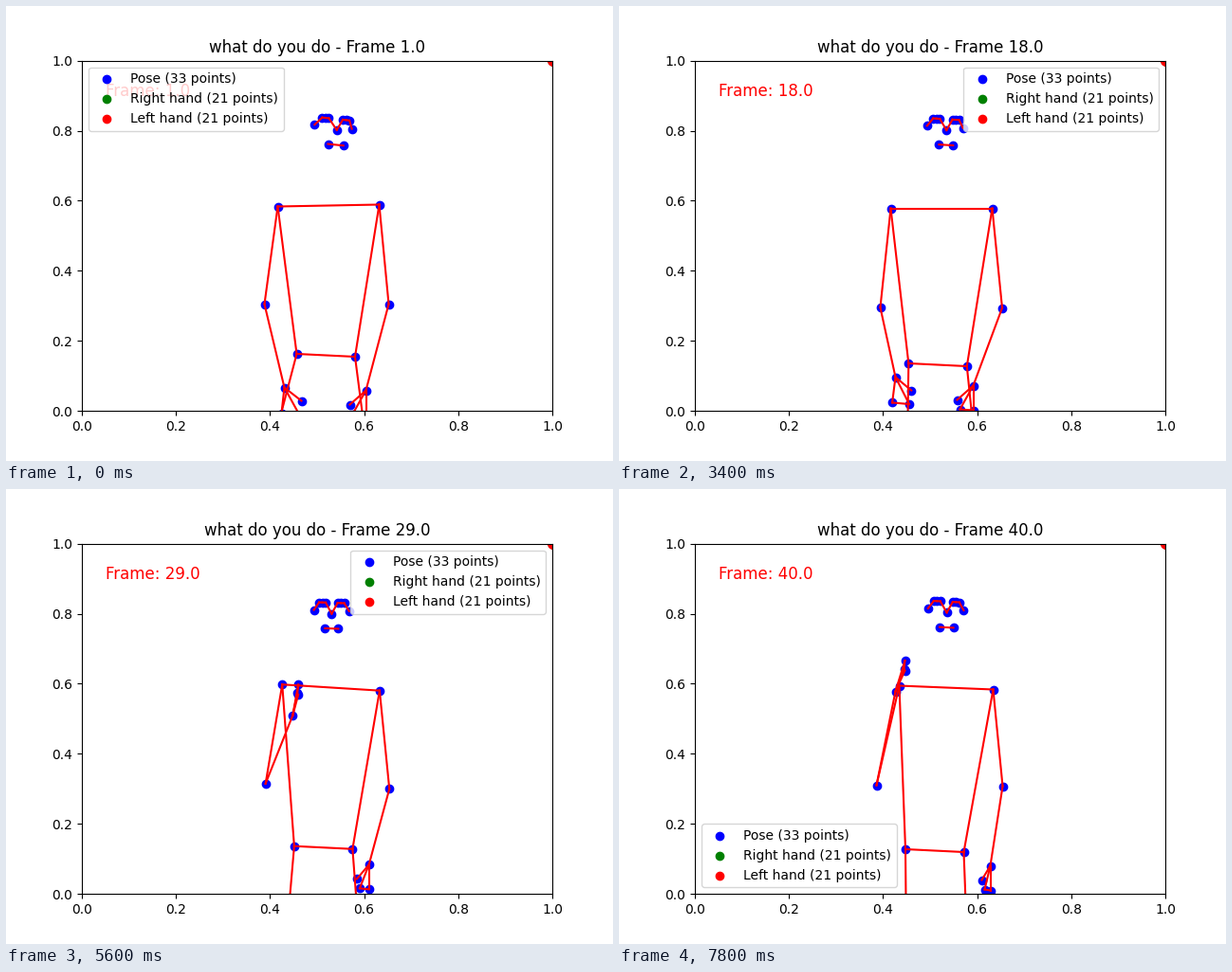
Animation of 640x480 px, one loop 8000 ms. Source, as a matplotlib script:

```python
import matplotlib.pyplot as plt
import numpy as np
from matplotlib.animation import FuncAnimation

COUNT, STEP_MS = 40, 200

# Phases of the gesture: first and last step of each.
PHASES = {"settle": (1, 6), "shift": (6, 11), "sink": (11, 18),
          "reach": (18, 25), "lift": (25, 34), "drop": (34, 40)}
SIDES = {"r": -1, "l": 1}
CHAIN = ["shoulder", "elbow", "wrist"]
LEG = ["shoulder", "hip", "knee", "ankle"]
PALM = ["wrist", "pinky", "index", "wrist", "thumb"]
EYES = ["inner", "eye", "outer", "ear"]


def amount(name, n):
    a, b = PHASES[name]
    s = np.clip((n - a) / (b - a), 0, 1)
    return s * s * (3 - 2 * s)


def shifted(n, start, **moves):
    """Start value plus the share of each phase's move done by step n."""
    value = np.array(start, float)
    for name, move in moves.items():
        value += amount(name, n) * np.array(move)
    return value


def face(n):
    x, y, yaw = shifted(n, (343, 118.7, 0.75), settle=(0, 0.2, -0.12), shift=(0, 0, -0.23),
                        sink=(-0.3, 0, -0.1), reach=(-0.3, 0.6, -0.05),
                        lift=(0.5, 0, -0.5), drop=(0.8, -1.2, 0.45))

    def at(side, spread, depth, down):
        return (x + side * (spread + 1.5 * yaw) + yaw * depth,
                y + down + 0.12 * side * spread * (yaw + 0.25))

    pts = {"nose": (x + 7 * yaw, y + 11.6)}
    for key, side in SIDES.items():
        for i, name in enumerate(EYES[:3]):
            pts[f"{key}_{name}"] = at(side, 6.2 + 3.5 * i, 5.7, 0)
        pts[f"{key}_ear"] = at(side, 18.5, 2, 8.2)
        pts[f"{key}_mouth"] = at(side, 7, 5.5, 27.2)
    return pts


def torso(n):
    hips = shifted(n, (0, 0), settle=(0, 7), sink=(-1.2, 3), reach=(-0.8, 1),
                   lift=(-1.5, -3), drop=(-1, 5))
    pts = {
        "r_shoulder": shifted(n, (286, 211), settle=(0, 2), reach=(1, -1),
                              lift=(9, -15), drop=(-1, 10)),
        "l_shoulder": shifted(n, (393, 209), settle=(0, 4), lift=(1, -2)),
        "r_hip": hips + (306, 366.5),
        "l_hip": hips + (367.5, 369.5),
        "r_knee": shifted(n, (286, 443), settle=(11, -9), shift=(6, -12),
                          sink=(1, 11), reach=(-8, 0), lift=(6, 0)),
        "l_knee": shifted(n, (376, 435), settle=(6, 0), sink=(-10, 0), lift=(-7, 0)),
    }
    for key in SIDES:
        pts[f"{key}_ankle"] = pts[f"{key}_knee"] + (0, 130)
    return pts


def right_arm(n):
    wrist = shifted(n, (293, 402), settle=(6, -2), shift=(-9, -4), sink=(1, -5),
                    reach=(12, -135), lift=(-3, -42), drop=(-9, -1))
    spread = shifted(n, 1, shift=-0.8, sink=0.7)
    up, lean = amount("reach", n), 3 + 7 * amount("lift", n)

    def finger(hanging, raised):
        return wrist + (1 - up) * np.array(hanging) + up * np.array(raised)

    return {
        "r_elbow": shifted(n, (272, 314), settle=(3, 3.5), reach=(-1, 9.5),
                           lift=(-2, -40), drop=(-1, 25)),
        "r_wrist": wrist,
        "r_pinky": finger((4 * spread - 7, 26 + spread), (lean - 1, -23.5)),
        "r_index": finger((1 + 15 * spread, 24 + 5 * spread), (lean, -32.5)),
        "r_thumb": finger((5 + 13 * spread, 14), (lean, -22)),
    }


def left_arm(n):
    wrist = shifted(n, (379, 405), settle=(-3, 4), shift=(5, -1), sink=(-8, -8),
                    reach=(5, -5), lift=(10, 2), drop=(3, 0))
    spread = shifted(n, 17, reach=-3, lift=-3, drop=-2)
    return {
        "l_elbow": shifted(n, (403, 314), settle=(0.5, 6), sink=(0, -2), lift=(0.5, -5)),
        "l_wrist": wrist,
        "l_pinky": wrist + (0, 26),
        "l_index": wrist + (3 - spread, 25),
        "l_thumb": wrist + (-spread, 15),
    }


def pose(n):
    """All joints in axes units, worked out in stage pixels."""
    joints = {**face(n), **torso(n), **right_arm(n), **left_arm(n)}
    return {name: ((x + 0.5 - 80) / 496, (426.7 - y) / 369.6)
            for name, (x, y) in joints.items()}


def edges():
    pairs = [(f"r_{part}", f"l_{part}") for part in ("mouth", "shoulder", "hip")]
    for key in SIDES:
        pairs.append(("nose", f"{key}_inner"))
        for chain in (EYES, CHAIN, LEG, PALM):
            pairs += [(f"{key}_{a}", f"{key}_{b}") for a, b in zip(chain, chain[1:])]
    return [p for p in pairs if "index" not in p[0]] + [
        (f"{key}_{a}", f"{key}_index") for key in SIDES for a in ("wrist",)]


def legend_place(n):
    if n < 9:
        return "upper left"
    return "upper right" if n < 39 else "lower left"


fig, ax = plt.subplots(figsize=(6.4, 4.8), dpi=100)
ax.set_xlim(0, 1)
ax.set_ylim(0, 1)
corner = np.ones(21)
dots = ax.scatter([], [], color="blue", label="Pose (33 points)")
ax.scatter(corner, corner, color="green", label="Right hand (21 points)")
ax.scatter(corner, corner, color="red", label="Left hand (21 points)")
EDGES = edges()
bones = [ax.plot([], [], color="red")[0] for _ in EDGES]
counter = ax.text(0.05, 0.9, "", color="red", fontsize=12)
title = ax.set_title("")
legend = ax.legend(loc="upper left")


def update(i):
    n = i + 1
    pts = pose(n)
    dots.set_offsets(list(pts.values()))
    for bone, (a, b) in zip(bones, EDGES):
        bone.set_data(*zip(pts[a], pts[b]))
    counter.set_text(f"Frame: {n:.1f}")
    title.set_text(f"what do you do - Frame {n:.1f}")
    legend.set_loc(legend_place(n))
    return [dots, *bones, counter, title, legend]


anim = FuncAnimation(fig, update, frames=COUNT, interval=STEP_MS, repeat=True,
                     repeat_delay=0, init_func=lambda: update(0), blit=False)
plt.show()
```
